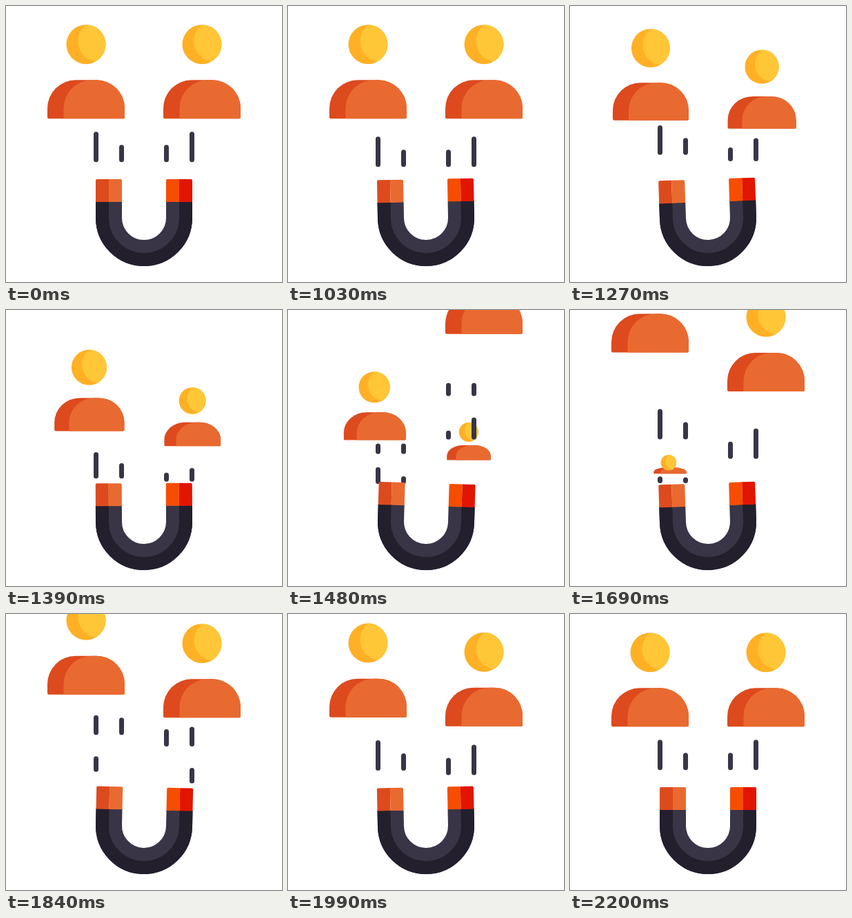
Recreate the animation shown at these times as an HTML page with a canvas. Size 400x400 px, loop 2.23 s.

```html
<!DOCTYPE html>
<html lang="en">
<head>
<meta charset="utf-8">
<title>Magnet attracting people</title>
<style>
  html, body { margin: 0; height: 100%; overflow: hidden; background: #fff; }
  canvas { display: block; }
</style>
</head>
<body>
<canvas id="stage" width="400" height="400"></canvas>
<script>
const ctx = document.getElementById('stage').getContext('2d');
const LOOP = 2230, HOLD = 1030, STEP = 30, STEPS = 40;

// left/right: edge travel while pulled in; leave/arrive: first and last step of the two moves
const sides = [
  { x: 60, left: 73, right: -4, head: 32, shrink: 20.5, fade: 1.1,
    leave: 5.6, arrive: 39.7, outer: 130.5, inner: 167.5 },
  { x: 228, left: 3.6, right: -75, head: -36, shrink: 23.5, fade: 1.7,
    leave: 1, arrive: 34.56, outer: 269.5, inner: 232.5 }
];

function box(x, y, w, h, radii, color) {
  ctx.fillStyle = color;
  ctx.beginPath();
  ctx.roundRect(x, y, w, h, radii);
  ctx.fill();
}

function disc(x, y, r, color) {
  ctx.fillStyle = color;
  ctx.beginPath();
  ctx.arc(x, y, r, 0, 7);
  ctx.fill();
}

function person(side, pull, lift) {
  const bottom = 163.3 + 88 * pull - lift;
  ctx.save();
  ctx.translate(side.x + side.left * pull, bottom - 56 * (1 - pull));
  ctx.scale(1 + (side.right - side.left) * pull / 112, 1 - pull);
  box(0, 0, 112, 56, [41, 41, 2, 2], '#dd4a1e');
  box(23.5, 0, 88.5, 56, [41, 41, 2, 0], '#e86a30');
  ctx.restore();

  const r = 28.5 - side.shrink * pull;
  ctx.save();
  ctx.translate(side.x + 56 + side.head * pull, 55.7 + 197 * pull - lift);
  ctx.scale(r, r);
  disc(0, 0, 1, '#ffb024');
  ctx.clip();
  disc(.63, -.16, 1.04, '#ffc637');
  ctx.restore();
}

function dash(x, from, to) {
  ctx.beginPath();
  ctx.moveTo(x, from);
  ctx.lineTo(x, to + .01);
  ctx.stroke();
}

// A dash runs down a track and wraps from its end to its start
function streak(x, length, phase, scale, lift) {
  const track = 75 * scale, bottom = 248.5 - lift / 2, top = bottom - track;
  const head = top + track * phase, tail = head - length * scale;
  dash(x, Math.max(top, tail), head);
  if (tail < top) dash(x, bottom - (top - tail), bottom);
}

function group(side, step, pull, lift) {
  const scale = 1 - side.fade * pull, phase = (.656 + .094 * step) % 1;
  person(side, pull, lift);
  if (scale <= 0) return;
  ctx.strokeStyle = '#393446';
  ctx.lineWidth = 7;
  ctx.lineCap = 'round';
  streak(side.outer, 37, phase, scale, lift);
  streak(side.inner, 18, phase, scale, lift);
}

function bend(radius, color) {
  ctx.strokeStyle = color;
  ctx.beginPath();
  ctx.moveTo(-radius, -23.5);
  ctx.arc(0, 0, radius, Math.PI, 0, true);
  ctx.lineTo(radius, -23.5);
  ctx.stroke();
}

function magnet(angle) {
  ctx.save();
  ctx.translate(200, 307);
  ctx.rotate(angle);
  ctx.lineCap = 'butt';
  ctx.lineWidth = 38;
  bend(51, '#393446');
  ctx.lineWidth = 19;
  bend(60.5, '#231f2c');
  box(-70, -56, 19, 33, [2, 0, 0, 0], '#dd4a1e');
  box(-51, -56, 19, 33, [0, 2, 0, 0], '#e86a30');
  box(32, -56, 19, 33, [2, 0, 0, 0], '#f64d00');
  box(51, -56, 19, 33, [0, 2, 0, 0], '#e21500');
  ctx.restore();
}

function draw(now) {
  const t = now % LOOP;
  // Step 0 is the resting pose, which also closes the loop
  const step = t < HOLD ? 0 : (Math.floor((t - HOLD) / STEP) + 1) % STEPS;
  ctx.fillStyle = '#fff';
  ctx.fillRect(0, 0, 400, 400);
  for (const side of sides) {
    const pull = (Math.max(0, step - side.leave) / 18.9) ** 2.1;
    const lift = .208 * Math.max(0, side.arrive - step) ** 2.2;
    if (pull < 1) group(side, step, pull, 0);
    if (lift < 162) group(side, step, 0, lift);
  }
  // A shake that quickens with time
  const shake = .099 * step - .0075 * step ** 2;
  magnet(-.035 * Math.sin(2 * Math.PI * shake));
}

const start = performance.now();
function tick() {
  draw(performance.now() - start);
  requestAnimationFrame(tick);
}
tick();
</script>
</body>
</html>
```
